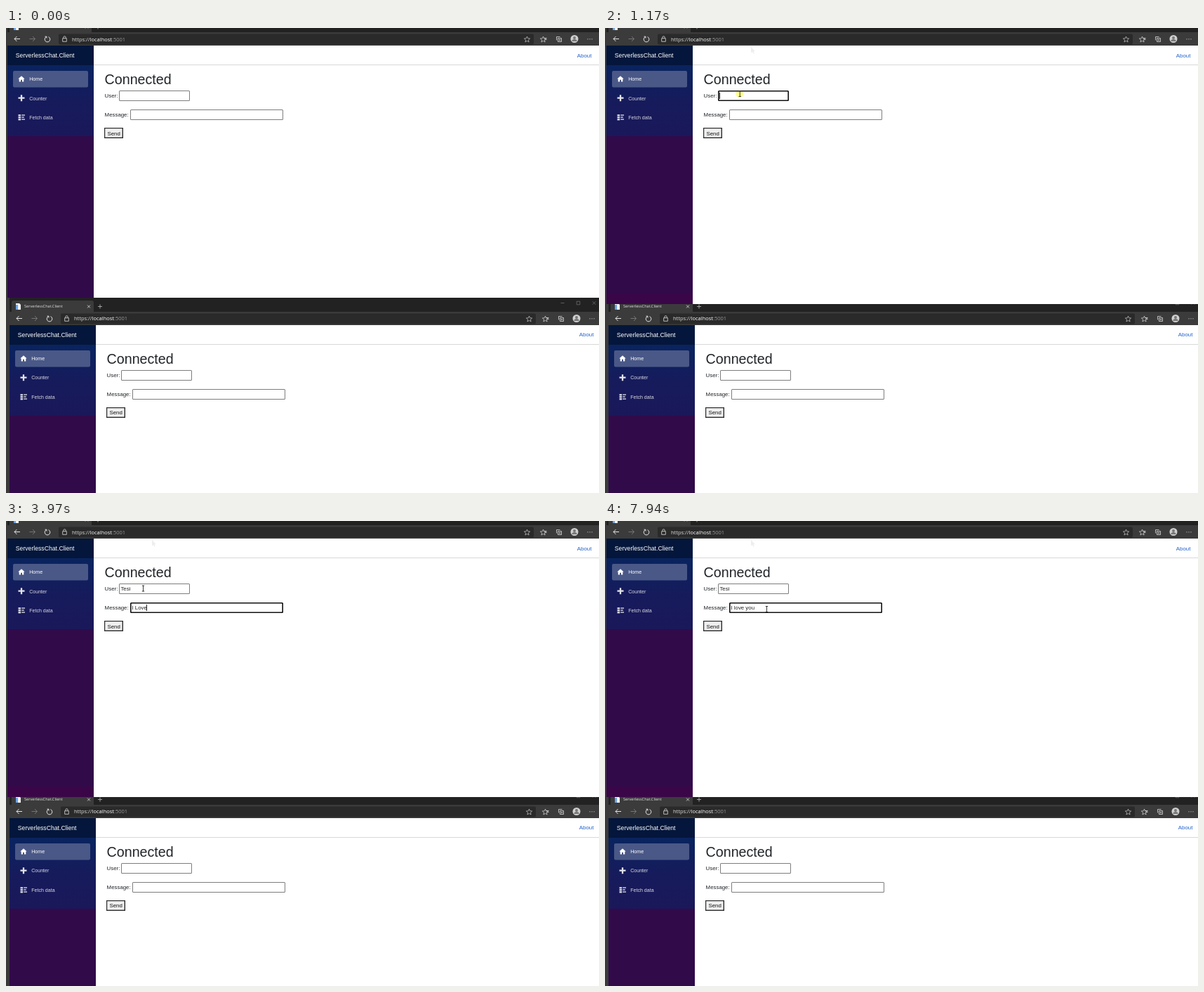
An HTML page with a canvas that plays this animation: 845 px wide and 662 px high, repeating every 7.99 s.

```html
<!DOCTYPE html>
<html lang="en">
<head>
<meta charset="utf-8">
<title>Chat demo</title>
<style>
html, body { margin: 0; width: 100%; height: 100%; overflow: hidden; background: #3a3a3a; }
canvas { display: block; }
</style>
</head>
<body>
<canvas id="stage" width="845" height="662"></canvas>
<script>
const c = document.getElementById('stage').getContext('2d');
const LOOP = 7990, RAISE = 990;
const ARIAL = '"Liberation Sans", Arial, sans-serif', UI = '"Open Sans", sans-serif';
const BODY = '7.87px ' + ARIAL, NAV = '7.08px ' + ARIAL;
const NAME = 'Tesi', FULL = 'I Love you';
let nudge = 0;

// [time, text, caret position (-1 = hidden)]
const userKeys = [[0, '', -1], [1040, '', 0], [1540, '', -1],
  ...[1730, 1820, 1960, 2150].map((t, i) => [t, NAME.slice(0, i + 1), i + 1]),
  [2530, NAME, -1]];
const messageKeys = [[0, '', -1], [2530, '', 0], [3080, '', -1],
  ...[3260, 3360, 3630, 3820, 3900, 3970, 4200, 4380, 4460, 4530].map((t, i) => [t, FULL.slice(0, i + 1), i + 1]),
  ...[[5090, -1], [5180, 9], [5630, 8], [6120, 7], [6160, 5], [6210, 4], [6430, 3]].map(([t, p]) => [t, FULL, p]),
  [6860, 'I ove you', 2], [7110, 'I love you', 3], [7610, 'I love you', -1]];

// [time, x, y]
const pointerPath = [[110, 774, 655], [530, 208, 28], [570, 137, 18], [609, 137, 18], [660, 135, 8], [900, 191, 93],
  [1130, 191, 93], [1350, 195, 96], [7530, 195, 96], [7660, 241, 125], [7890, 241, 125], [7940, 230, 125.5]];

const current = (keys, t) => keys.filter(k => k[0] <= t).pop();

function box(x, y, w, h, fill, r = 0) {
  c.fillStyle = fill;
  c.beginPath();
  c.roundRect(x, y, w, h, r);
  c.fill();
}

function text(s, x, y, font, fill) {
  c.font = font;
  c.fillStyle = fill;
  c.fillText(s, x, y + nudge);
  return x + c.measureText(s).width;
}

function line(d, color, width = 1, x = 0, y = 0) {
  c.save();
  c.translate(x, y);
  c.strokeStyle = color;
  c.lineWidth = width;
  c.stroke(new Path2D(d));
  c.restore();
}

function shape(d, fill, x = 0, y = 0) {
  c.save();
  c.translate(x, y);
  c.fillStyle = fill;
  c.fill(new Path2D(d));
  c.restore();
}

function field(x, y, w, value = '', caret = -1, focused = false, border = '#7d7d7d') {
  box(x, y, w, 15, focused ? '#101010' : border, 1.5);
  const b = focused ? 1.6 : 1;
  box(x + b, y + b, w - 2 * b, 15 - 2 * b, '#fff', 0.5);
  text(value, x + 2.4, y + 10.3, BODY, '#222');
  if (caret >= 0) box(Math.round(x + 2 + c.measureText(value.slice(0, caret)).width), y + 3, 1, 9, '#222');
}

function browserBar() {
  box(2, -14, 843, 20, '#222');
  box(5, -10, 117, 17, '#3b3b3b', [3, 3, 0, 0]);
  box(2, 6, 843, 20, '#3b3b3b');
  shape('M0 0h5l2 2v7H0z', '#f2f2f2', 11, -6);
  box(11, -4, 3, 7, '#6aa5e8');
  text('ServerlessChat.Client', 23, 0.4, '5.6px ' + UI, '#e0e0e0');
  line('M-2-2l4 4M2-2l-4 4', '#ddd', 0.8, 115, -1.5);
  line('M-3 0h6M0-3v6', '#bbb', 0.8, 131, -1.5);
  line('M-2.5 0h5', '#777', 0.7, 790, -6.5);
  line('M-2.3-2.3h4.6v4.6h-4.6z', '#777', 0.7, 812.5, -6.5);
  line('M-2.3-2.3l4.6 4.6M2.3-2.3l-4.6 4.6', '#777', 0.7, 835, -6.5);

  line('M4 0h-8m3.5-3.5L-4 0l3.5 3.5', '#e4e4e4', 1, 16, 15.5);
  line('M-4 0h8M.5-3.5L4 0 .5 3.5', '#747474', 1, 37.5, 15.5);
  line('M-1.5-3.4A3.8 3.8 0 1 0 1.5-3.4M-3.4-3.8h2.3v2.3', '#e4e4e4', 1, 59, 16);

  box(75, 8.5, 677, 15, '#2a2a2a', 2);
  line('M-2.8-.8h5.6v4.6h-5.6zM-1.6-.8v-1.4a1.6 1.6 0 0 1 3.2 0v1.4', '#ddd', 0.8, 83.5, 15.5);
  const url = '7.5px ' + UI;
  let x = text('https://', 94, 18.6, url, '#dedede');
  x = text('localhost', x, 18.6, url, '#fff');
  text(':5001', x, 18.6, url, '#999');

  const star = 'M0-4l1.2 2.8 3 .2-2.3 2 .7 3L0 2.4-2.6 4l.7-3-2.3-2 3-.2z';
  line(star, '#ccc', 0.7, 742.5, 16);
  line(star, '#ddd', 0.7, 765.5, 16);
  line('M1-1.5h4M2 .5h3', '#ddd', 0.8, 765.5, 16);
  line('M-1.5-1.5h5v5h-5zM-3.5 1.5v-5h5M1-.3v2.6M-.3 1h2.6', '#ddd', 0.8, 788, 16);
  shape('M-5.5 0a5.5 5.5 0 1 1 11 0a5.5 5.5 0 1 1-11 0', '#d0d0d0', 810, 15.5);
  shape('M-2-1.6a2 2 0 1 1 4 0a2 2 0 1 1-4 0M-3.7 3.6a3.7 3 0 0 1 7.4 0z', '#777', 810, 15.5);
  for (let i = -1; i < 2; i++) box(832 + i * 3 - 0.6, 15.2, 1.2, 1.2, '#ddd', 0.6);
}

function sidebar(raised) {
  box(2, 25, 123, 28, '#04163b');
  const blue = c.createLinearGradient(0, 53, 0, 154);
  blue.addColorStop(0, '#09245f');
  blue.addColorStop(0.5, '#161b5c');
  blue.addColorStop(1, '#1a185a');
  box(2, 53, 123, 101, blue);
  box(2, 154, 123, 240, '#310a4a');
  if (raised) box(2, 378, 123, 16, '#3a0647');
  text('ServerlessChat.Client', 13.8, 42.3, '8.66px ' + ARIAL, '#fff');
  box(10, 61, 107, 23.5, '#4a5887', 2);
  text('Home', 33.2, 75.2, NAV, '#fff');
  text('Counter', 33.2, 102.9, NAV, '#d8d8de');
  text('Fetch data', 33.2, 130.3, NAV, '#d8d8de');
  shape('M0-4.5l4.7 4.3H3.3v4H1V1h-2v2.8h-2.3v-4h-1.4z', '#fff', 22, 72.7);
  line('M-4.5 0h9M0-4.5v9', '#e4e4ea', 2.3, 22, 99.7);
  for (let i = 0; i < 3; i++) {
    box(17.5, 123.2 + i * 3, 3.6, 2.2, '#e4e4ea');
    box(22.2, 123.4 + i * 3, i == 1 ? 3.6 : 4.8, 1.3, '#e4e4ea');
  }
}

function browser(t, isTop) {
  c.save();
  c.beginPath();
  if (isTop) c.rect(0, 0, 845, 393);
  else c.rect(0, 384, 845, 278);
  c.clip();
  box(0, 0, 845, 662, '#3a3a3a');
  if (!isTop) c.translate(3, 398);
  nudge = isTop ? 0 : -0.5;

  browserBar();
  box(125, 25, 720, 370, '#fff');
  box(125, 52, 720, 1, '#d8d8d8');
  sidebar(isTop && t >= RAISE);
  text('About', 813.8, 41.8, BODY, '#2463cc');
  text('Connected', 140.6, 80.4, '19.67px ' + ARIAL, '#212529');
  text('User:', 140.6, 99.4, BODY, '#212529');
  text('Message:', 140.6, 126, BODY, '#212529');

  if (isTop) {
    const [, name, nameCaret] = current(userKeys, t);
    const [, message, messageCaret] = current(messageKeys, t);
    const hover = t >= 860 && t < 1040;
    field(161, 89, 101, name, nameCaret, t >= 1040 && t < 2530, hover ? '#555' : undefined);
    field(177, 116, 218, message, messageCaret, t >= 2530);
  } else {
    field(161, 89, 101);
    field(177, 116, 218);
  }
  box(140, 142, 27, 15, '#2c2c2c');
  box(141.2, 143.2, 24.4, 12.4, '#efefef');
  text('Send', 144.4, 152.6, BODY, '#111');
  c.restore();
}

const ARROW = 'M0 0v8.5l2-1.8 1.3 3 1.4-.6-1.3-2.9h2.6z';

function pointer(t) {
  if (t >= 540) shape(ARROW, '#eee', 208, 27);
  if (t < 110) return;
  const i = pointerPath.findLastIndex(p => p[0] <= t);
  const [t0, x0, y0] = pointerPath[i];
  const [t1, x1, y1] = pointerPath[i + 1] || [t0 + 1, x0, y0];
  const k = Math.min(1, (t - t0) / (t1 - t0));
  const x = x0 + (x1 - x0) * k, y = y0 + (y1 - y0) * k;

  if (t >= RAISE && t < 1300) {
    c.globalAlpha = Math.min(1, (1300 - t) / 250) * 0.85;
    c.globalCompositeOperation = 'multiply';
    shape('M-5.5 0a5.5 5 0 1 1 11 0a5.5 5 0 1 1-11 0', '#ffff00', x, y + 0.5);
    c.globalAlpha = 1;
    c.globalCompositeOperation = 'source-over';
  }
  const overUrl = y > 9 && y < 23;
  const overField = y > 88 && y < 131 && x < 395;
  if (overUrl || overField) {
    line('M-1.7-4h3.4M0-4v8M-1.7 4h3.4', overUrl ? '#e8e8e8' : '#222', 0.9, x + 0.5, y);
  } else {
    shape(ARROW, '#fff', x, y);
    line(ARROW, '#111', 0.7, x, y);
  }
}

function draw(now) {
  const t = now % LOOP;
  const raised = t >= RAISE;
  browser(t, !raised);
  browser(t, raised);
  pointer(t);
  requestAnimationFrame(draw);
}
requestAnimationFrame(draw);
</script>
</body>
</html>
```
